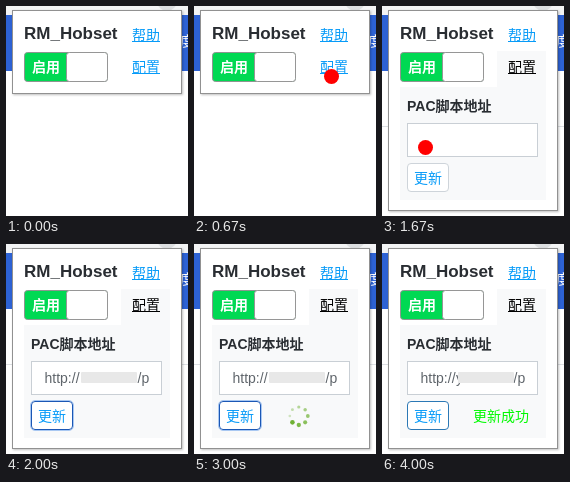
An HTML page for the animation above (5000 ms loop, 182 by 210 pixels).

```html
<!DOCTYPE html>
<html lang="zh-CN">
<head>
<meta charset="utf-8">
<title>RM_Hobset</title>
<style>
  html, body { margin: 0; width: 100%; height: 100%; overflow: hidden; background: #fff; }
  svg { display: block; width: 182px; height: 210px; }
  text { font: 14px "Liberation Sans", "Noto Sans CJK SC", "Noto Sans CJK", sans-serif; white-space: pre; }
  .bold { font-weight: 700; }
  .link { fill: #079bf8; }
  .ink { fill: #292d32; }
  .value { fill: #5f656b; }
</style>
</head>
<body>
<svg viewBox="0 0 182 210" xmlns="http://www.w3.org/2000/svg">
  <defs>
    <filter id="shadow" x="-10%" y="-10%" width="120%" height="120%">
      <feDropShadow dx="1" dy="1" stdDeviation="1.2" flood-color="#000" flood-opacity=".25"/>
    </filter>
  </defs>

  <rect width="182" height="210" fill="#fff"/>
  <rect width="182" height="9" fill="#f3f4f5"/>
  <circle cx="161" cy="-5" r="10" fill="#dcdee0"/>
  <rect y="9" width="182" height="56" fill="#2d62d4"/>
  <text x="174" y="40" fill="#fff">度</text>
  <rect id="rule" y="120" width="182" height="1" fill="#dcdfe3"/>

  <rect id="popup" x="6.5" y="4.5" width="169" fill="#fff" stroke="#919191" filter="url(#shadow)"/>

  <g id="panel">
    <path d="M115 45H164V194H18V81H115Z" fill="#f8f9fa"/>
    <text class="bold ink" x="25" y="105">PAC脚本地址</text>
    <rect x="25.5" y="117.5" width="130" height="33" fill="#fff" stroke="#c9cfd5"/>
    <g id="address" class="value">
      <text x="38.5" y="139">http://</text>
      <text x="131.5" y="139">/p</text>
      <text id="sliver" x="74" y="139">y</text>
      <rect id="mask" y="128" width="56" height="11" rx="1" fill="#e8e8e8"/>
    </g>
    <rect id="halo" x="24.5" y="156.5" width="43" height="30" rx="4.5" fill="none" stroke="#a9c8f2"/>
    <rect id="button" x="25.5" y="157.5" width="41" height="28" rx="3.5" fill="#fff"/>
    <text class="link" x="32" y="177">更新</text>
    <g id="spinner"></g>
    <text id="success" x="91" y="177" fill="#00fa00">更新成功</text>
  </g>

  <text class="bold ink" x="18" y="33" style="font-size:17px">RM_Hobset</text>
  <text class="link" x="126" y="33.5">帮助</text>
  <rect class="link" x="126" y="35" width="28" height="1"/>
  <g id="config">
    <text x="126" y="65.5">配置</text>
    <rect x="126" y="67" width="28" height="1"/>
  </g>

  <rect x="18.5" y="46.5" width="83" height="29" rx="3" fill="#00d953" stroke="#8d9590"/>
  <rect x="60.5" y="46.5" width="41" height="29" rx="3" fill="#fff" stroke="#969696"/>
  <text class="bold" x="26" y="66" fill="#fff">启用</text>

  <circle id="click" r="7.5" fill="#f00"/>
</svg>
<script>
const LOOP = 5000;
const OPEN = 1000, FILLED = 2000, LOADING = 3000, DONE = 4000;
const clicks = [
  { from: 670, to: OPEN, x: 137.5, y: 70.5 },
  { from: 1670, to: FILLED, x: 43.5, y: 141.5 },
  { from: 2670, to: LOADING, x: 46.5, y: 186.5 }
];

const el = id => document.getElementById(id);
const toggle = (id, on) => el(id).setAttribute('display', on ? 'inline' : 'none');
const set = (id, attrs) => {
  for (const name in attrs) el(id).setAttribute(name, attrs[name]);
};

// Eight dots, strongest at the lower left, shrinking and fading counterclockwise.
for (let i = 0; i < 8; i++) {
  const angle = Math.PI * 3 / 4 - i * Math.PI / 4;
  const dot = document.createElementNS('http://www.w3.org/2000/svg', 'circle');
  dot.setAttribute('cx', 104.8 + 9 * Math.cos(angle));
  dot.setAttribute('cy', 172 + 9 * Math.sin(angle));
  dot.setAttribute('r', 2.3 - i * 0.14);
  dot.setAttribute('fill', '#6fb134');
  dot.setAttribute('opacity', 1 - i * 0.1);
  el('spinner').append(dot);
}

function buttonBorder(t) {
  if (t < FILLED) return '#ced4da';
  return t < DONE ? '#1b57b5' : '#2b78b5';
}

function render(t) {
  const open = t >= OPEN;
  set('popup', { height: open ? 200 : 83 });
  toggle('panel', open);
  toggle('rule', open);
  set('config', { fill: open ? '#000' : '#079bf8' });

  toggle('address', t >= FILLED);
  toggle('sliver', t >= DONE);
  set('mask', { x: t >= DONE ? 76 : 75 });
  set('button', { stroke: buttonBorder(t) });
  toggle('halo', t >= FILLED && t < DONE);
  toggle('spinner', t >= LOADING && t < DONE);
  toggle('success', t >= DONE);

  const click = clicks.find(c => t >= c.from && t < c.to);
  toggle('click', click);
  if (click) set('click', { cx: click.x, cy: click.y });
}

const start = performance.now();
function tick() {
  render((performance.now() - start) % LOOP);
  requestAnimationFrame(tick);
}
tick();
</script>
</body>
</html>
```
